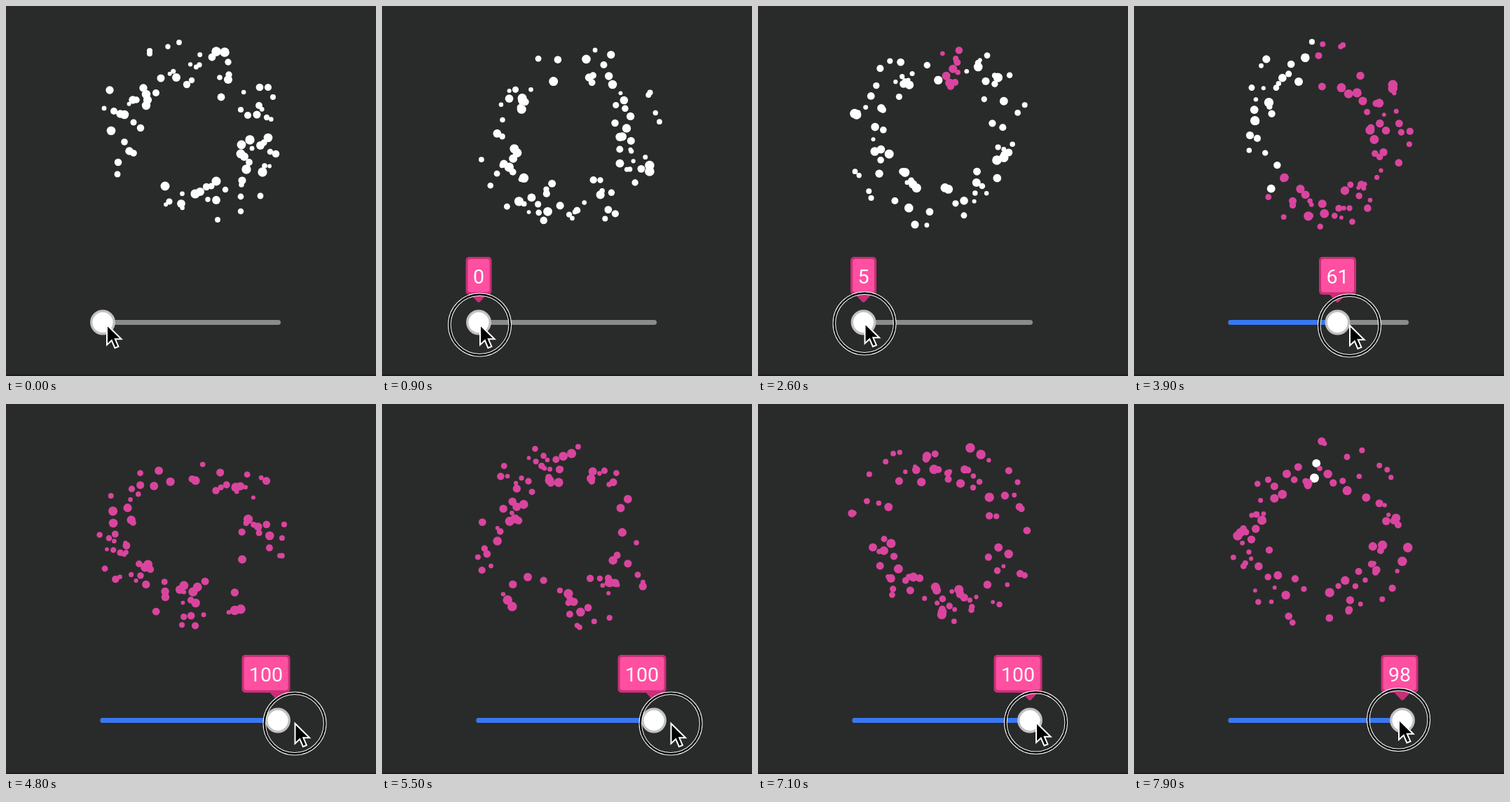
An HTML page that plays this animation: 528 by 528 pixels, repeating every 8000 ms.

```html
<!DOCTYPE html>
<html lang="en">
<head>
<meta charset="utf-8">
<title>Particle ring slider</title>
<style>
  html, body { margin: 0; width: 100%; height: 100%; overflow: hidden; background: #292b2a; }
  svg { display: block; width: 528px; height: 528px; }
  .tip text { font: 28.5px Roboto, Arial, sans-serif; fill: #fff; text-anchor: middle; }
</style>
</head>
<body>
<svg viewBox="0 0 528 528">
  <rect width="528" height="528" fill="#292b2a"/>
  <rect y="526" width="528" height="2" fill="#1b1d1c"/>
  <g id="dots"></g>

  <rect x="134.5" y="448" width="257.5" height="7" rx="3.5" fill="#8a8c8b"/>
  <rect id="fill" x="134.5" y="448" height="7" rx="3.5" fill="#3878f3"/>
  <g class="tip" id="tip">
    <path id="tail" d="M-13 410H13L2 422Q0 424-2 422Z" fill="#c72f78"/>
    <rect id="frame" y="358" height="54" rx="5" fill="#c72f78"/>
    <rect id="face" y="361" height="47.5" rx="4" fill="#ff4fa1"/>
    <text id="label" y="395.5"></text>
  </g>
  <circle id="thumb" cy="451.5" r="16.2" fill="#fff" stroke="#c1c1c1" stroke-width="3.4"/>

  <g id="pointer">
    <g id="press" fill="none">
      <circle cx="-.5" cy="1" r="43.2" stroke="#fff" stroke-width="4.6"/>
      <circle cx="-.5" cy="1" r="43.2" stroke="#000" stroke-width="2.6"/>
    </g>
    <path d="M0 1V29.5L6.8 23.3 11.4 34 16.4 31.9 11.8 21.3H20.6Z" fill="#000" stroke="#fff" stroke-width="2"/>
  </g>
</svg>
<script>
  const LOOP = 8000, STEP = 100, CX = 263, CY = 185.5;
  const WHITE = '#fff', PINK = '#d9459e';
  const $ = id => document.getElementById(id);
  const set = (el, attrs) => { for (const k in attrs) el.setAttribute(k, attrs[k]); };

  // Starting points of the dots, largest dot first
  const starts = [
    312,66, 300,65, 348,191, 343,233, 366,237, 270,268, 300,250, 227,257,
    335,211, 336,198, 374,188, 150,178, 169,155, 200,126, 200,142, 202,134,
    277,265, 317,105, 340,215, 243,102, 363,199, 300,277, 250,282, 176,207,
    181,134, 163,154, 196,117, 148,120, 337,249, 358,155, 221,103, 307,130,
    294,73, 362,116, 160,223, 385,211, 192,174, 286,258, 258,112, 374,116,
    345,156, 214,124, 154,150, 361,142, 347,223, 182,210, 169,194, 186,134,
    318,98, 317,80, 368,195, 233,279, 182,166, 293,257, 159,240, 363,271,
    335,272, 377,208, 313,262, 335,293, 265,106, 372,159, 335,148, 205,64,
    381,130, 205,68, 302,305, 247,52, 369,228, 305,102, 336,255, 288,276,
    231,58, 276,84
  ];

  let seed = 11;
  const random = () => (seed = seed * 16807 % 2147483647) / 2147483647;

  const dots = [];
  function addDot(angle, radius, size) {
    const el = document.createElementNS('http://www.w3.org/2000/svg', 'circle');
    set(el, { r: size });
    $('dots').append(el);
    // Nearly constant linear speed, so the inner dots go round sooner
    const period = radius * (28.9 - 0.00064 * Math.max(0, radius - 85) ** 2);
    dots.push({ el, angle, radius, period });
  }

  const count = starts.length / 2;
  for (let i = 0; i < count; i++) {
    const dx = starts[2 * i] - CX, dy = starts[2 * i + 1] - CY;
    addDot(Math.atan2(dx, -dy) / (2 * Math.PI), Math.hypot(dx, dy), 6.8 - 3.2 * i / count);
  }
  for (let i = 0; i < 16; i++) addDot(random(), 78 + 54 * random(), 2.9 + 0.7 * random());

  // Pointer path: time, x, y
  const path = [
    [0, 144, 454], [300, 140, 454], [1200, 140, 454], [1700, 153, 452],
    [2600, 152.5, 452], [2700, 157, 452.5], [3780, 292, 455], [3900, 308, 455],
    [4500, 400, 456], [4700, 412.5, 455], [5700, 412.5, 455], [6000, 412, 450],
    [6400, 412, 450], [6800, 397, 453.5], [7400, 397, 453.5], [7780, 384, 450],
    [7900, 378, 449.5], [8000, 372, 449.5]
  ];
  const presses = [[300, 1000], [2300, 5700], [6900, 8000]];

  function pointerAt(t) {
    const i = Math.max(1, path.findIndex(p => p[0] >= t));
    const [t0, x0, y0] = path[i - 1], [t1, x1, y1] = path[i];
    const k = Math.max(0, (t - t0) / (t1 - t0));
    return [x0 + (x1 - x0) * k, y0 + (y1 - y0) * k];
  }

  // The thumb trails the pointer a little
  function valueAt(t) {
    if (t < presses[1][0]) return 0;
    const v = Math.floor((pointerAt(t - 120)[0] - 138) / 2.5);
    return Math.min(100, Math.max(0, v));
  }

  function drawDots(t, value) {
    for (const d of dots) {
      const turn = d.angle + t / d.period;
      const part = turn - Math.floor(turn);
      const a = part * 2 * Math.PI;
      set(d.el, {
        cx: CX + d.radius * Math.sin(a),
        cy: CY - d.radius * Math.cos(a),
        fill: part < value / 100 ? PINK : WHITE
      });
    }
  }

  function drawSlider(value, pressed) {
    const x = 138 + value * 2.5;
    set($('thumb'), { cx: x });
    set($('fill'), { width: value ? x - 134.5 : 0 });
    set($('tip'), { visibility: pressed ? 'visible' : 'hidden' });
    const text = String(value), width = 21 + 16 * text.length;
    const mid = Math.min(x, 405.5 - width / 2);
    set($('tail'), { transform: `translate(${x} 0)` });
    set($('frame'), { x: mid - width / 2, width });
    set($('face'), { x: mid - width / 2 + 3, width: width - 6 });
    set($('label'), { x: mid });
    $('label').textContent = text;
  }

  const begin = performance.now();
  function draw() {
    const now = (performance.now() - begin) % LOOP;
    const t = Math.floor(now / STEP) * STEP;
    const pressed = presses.some(([a, b]) => t >= a && t < b);
    const value = valueAt(t);
    drawDots(t, value);
    drawSlider(value, pressed);
    set($('press'), { visibility: pressed ? 'visible' : 'hidden' });
    set($('pointer'), { transform: `translate(${pointerAt(t).join(' ')})` });
    requestAnimationFrame(draw);
  }
  draw();
</script>
</body>
</html>
```
